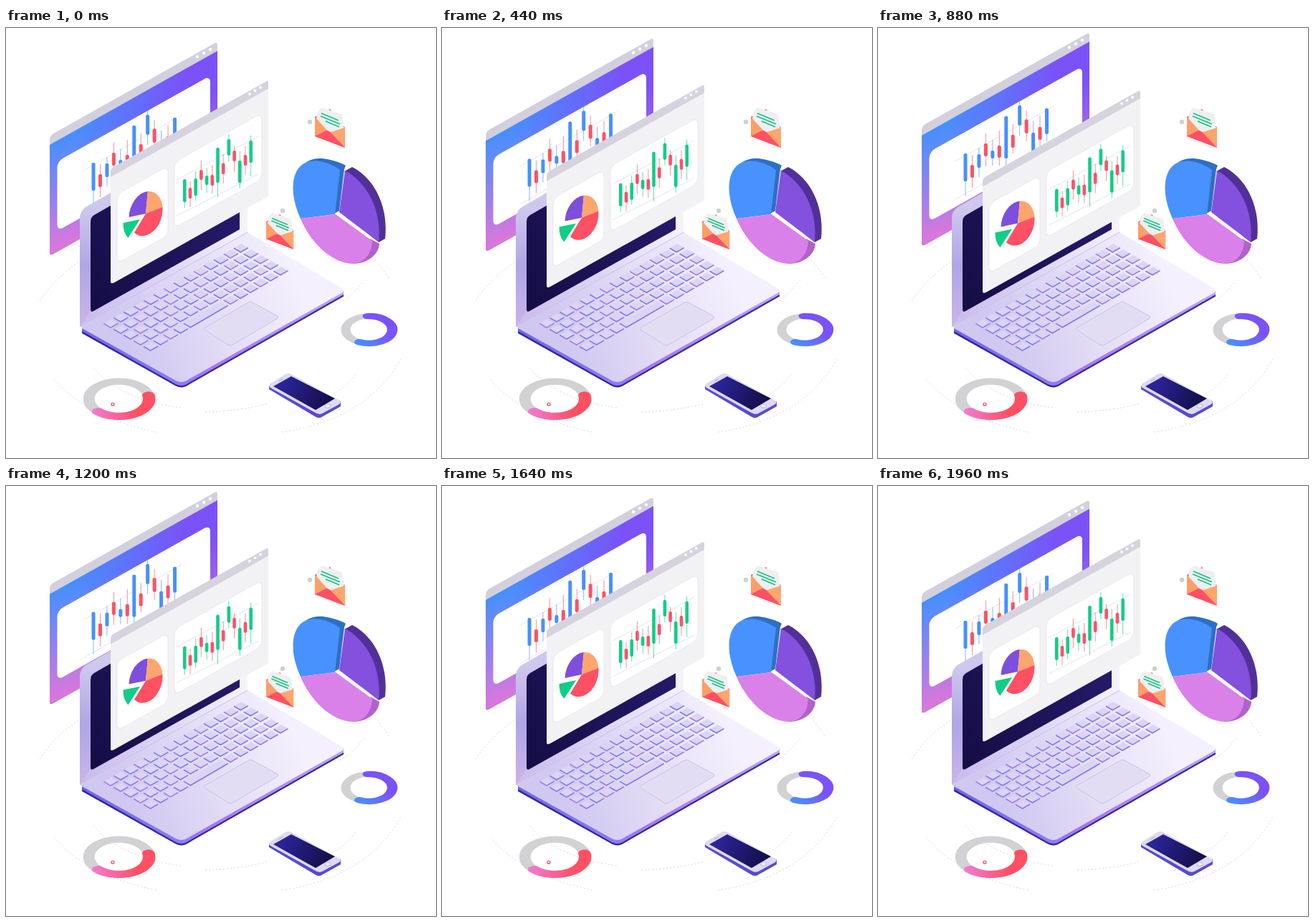
Animation of 600 by 600 pixels, one loop 2000 ms. Source, as an HTML page:

```html
<!DOCTYPE html>
<html lang="en">
<head>
<meta charset="utf-8">
<title>Isometric dashboard</title>
<style>
html, body { margin: 0; width: 100%; height: 100%; overflow: hidden; background: #fff; }
svg { display: block; width: 100vw; height: 100vh; }
</style>
</head>
<body>
<svg id="stage" viewBox="0 0 600 600">
  <defs>
    <linearGradient id="sky" gradientUnits="userSpaceOnUse" x1="40" y1="0" x2="190" y2="30">
      <stop offset="0" stop-color="#478fff"/><stop offset="1" stop-color="#7a52f7"/>
    </linearGradient>
    <linearGradient id="blush" gradientUnits="userSpaceOnUse" x1="40" y1="20" x2="8" y2="160">
      <stop offset="0" stop-color="#d877dc" stop-opacity="0"/><stop offset="1" stop-color="#d877dc"/>
    </linearGradient>
    <linearGradient id="lid" gradientUnits="userSpaceOnUse" x1="0" y1="250" x2="0" y2="415">
      <stop offset="0" stop-color="#cfc8ee"/><stop offset=".5" stop-color="#b0a5e6"/><stop offset="1" stop-color="#c9b4ea"/>
    </linearGradient>
    <linearGradient id="chin" gradientUnits="userSpaceOnUse" x1="110" y1="0" x2="337" y2="0">
      <stop offset="0" stop-color="#cbbcec"/><stop offset=".5" stop-color="#ddd5f4"/><stop offset="1" stop-color="#f6f3fd"/>
    </linearGradient>
    <linearGradient id="glass" gradientUnits="userSpaceOnUse" x1="118" y1="390" x2="326" y2="260">
      <stop offset="0" stop-color="#150d45"/><stop offset="1" stop-color="#251a69"/>
    </linearGradient>
    <linearGradient id="deck" gradientUnits="userSpaceOnUse" x1="170" y1="440" x2="400" y2="340">
      <stop offset="0" stop-color="#d0c8f0"/><stop offset=".5" stop-color="#e3ddf6"/><stop offset="1" stop-color="#f4f0fd"/>
    </linearGradient>
    <linearGradient id="side" gradientUnits="userSpaceOnUse" x1="106" y1="0" x2="471" y2="0">
      <stop offset="0" stop-color="#7065e8"/><stop offset=".36" stop-color="#8b7cf0"/>
      <stop offset=".5" stop-color="#a978e6"/><stop offset="1" stop-color="#b9a5ee"/>
    </linearGradient>
    <linearGradient id="phone" gradientUnits="userSpaceOnUse" x1="385" y1="490" x2="445" y2="525">
      <stop offset="0" stop-color="#2c259c"/><stop offset="1" stop-color="#15104d"/>
    </linearGradient>
    <linearGradient id="cool" gradientUnits="userSpaceOnUse" x1="-20" y1="30" x2="20" y2="0">
      <stop offset="0" stop-color="#4692ff"/><stop offset="1" stop-color="#7a52f8"/>
    </linearGradient>
    <linearGradient id="warm" gradientUnits="userSpaceOnUse" x1="-35" y1="0" x2="25" y2="0">
      <stop offset="0" stop-color="#ef7bd0"/><stop offset="1" stop-color="#ff5064"/>
    </linearGradient>
    <g id="mail">
      <path d="M431 124L452 113L473 139V167L431 151Z" fill="#ff5064"/>
      <path d="M434 118L440 111L469 120L472 142L453 152L433 128Z" fill="#efeff1"/>
      <path d="M440 119L464 129M439 123L466 134M446 130L465 138" stroke="#12c483" stroke-width="1.8"/>
      <path d="M431 124L451 146L431 151Z" fill="#ff9f68"/>
      <path d="M473 139V167L451 146Z" fill="#ffa56e"/>
      <path d="M431 151L447 143Q451 143 455 148L473 167Z" fill="#ff5064"/>
    </g>
  </defs>
  <g fill="none" stroke="#b9b9bd" stroke-width=".6" stroke-dasharray="2 3">
    <path d="M47 381Q70 345 116 317M68 491Q112 543 210 564M122 474Q160 519 246 530M278 536Q330 534 366 524"/>
    <path d="M385 564Q505 546 552 460M430 525Q470 508 488 483M491 305Q517 320 534 349M466 383Q482 374 500 352"/>
  </g>
  <g id="back"></g>
  <g id="laptop"></g>
  <g id="front"></g>
  <g id="extras"></g>
</svg>
<script>
const $ = id => document.getElementById(id);
const RED = '#ff5064', GREEN = '#0fce87', BLUE = '#4691ff';

const path = (d, fill, more = '') => `<path d="${d}" fill="${fill}" ${more}/>`;
const rect = (x, y, w, h, r, fill, more = '') =>
  `<rect x="${x}" y="${y}" width="${w}" height="${h}" rx="${r}" fill="${fill}" ${more}/>`;
const dot = (x, y, r, fill) => `<circle cx="${x}" cy="${y}" r="${r}" fill="${fill}"/>`;
const line = (x1, y1, x2, y2, color, w, opacity = 1) =>
  `<path d="M${x1} ${y1}L${x2} ${y2}" stroke="${color}" stroke-width="${w}" opacity="${opacity}"/>`;
const polar = (r, deg) => {
  const a = deg * Math.PI / 180;
  return `${(r * Math.cos(a)).toFixed(3)} ${(r * Math.sin(a)).toFixed(3)}`;
};
const arc = (r, from, to) => `${polar(r, from)}A${r} ${r} 0 ${to - from > 180 ? 1 : 0} 1 ${polar(r, to)}`;

// Each row: body top, body bottom, wick top, wick bottom.
function candles(x0, step, rows, up, width) {
  return rows.map(([top, end, high, low], i) => {
    const x = x0 + i * step, color = i % 2 ? RED : up;
    return line(x, high, x, low, color, 1, .65) + rect(x - width / 2, top, width, end - top, 2, color);
  }).join('');
}

function backWindow() {
  const bar = 'M0 13V6Q0 0 6 0H230Q234 0 234 5V13Z';
  const body = 'M0 12H234V168H5Q0 168 0 164Z';
  const rows = [
    [188, 227, 188, 247], [204, 222, 190, 236], [189, 208, 180, 221], [174, 192, 160, 206],
    [184, 195, 169, 205], [177, 194, 156, 205], [136, 195, 136, 205], [162, 180, 147, 188],
    [121, 149, 113, 163], [140.5, 160, 128, 171], [159, 185, 143, 198], [151, 169, 135, 178],
    [125, 161, 125, 171]];
  return `<g transform="matrix(1 -.56 0 1 61 150)">
    ${path(body, 'url(#sky)')}${path(body, 'url(#blush)')}${path(bar, '#d3d0de')}
    ${rect(10.5, 42, 213.5, 97, 8, '#fff')}</g>` +
    dot(267, 40, 2.2, '#fff') + dot(276, 35, 2.2, '#fff') + dot(285, 30, 2.2, '#fff') +
    line(108, 199, 245, 122, '#dcdcf2', .8) + line(108, 252, 245, 175, '#dcdcf2', .8) +
    candles(122, 9.46, rows, BLUE, 5);
}

function pieChart() {
  const slice = (from, to, fill, x = 0, y = 0) =>
    `<g transform="matrix(23.5 -6 0 30.5 ${195 + x} ${259 + y})">${path(`M0 0L${arc(1, from, to)}Z`, fill)}</g>`;
  return slice(182, 277, '#7d4fdc') + slice(277, 354, '#ffa56e') +
    slice(-6, 133, RED) + slice(135, 182, GREEN, -8, 8);
}

function frontWindow() {
  const rows = [
    [211, 243, 211, 251], [223, 238, 214, 250], [210, 234, 200, 241], [198, 212, 185, 226],
    [206, 219, 195, 230], [205, 220, 191, 231], [167, 216, 167, 236], [188.5, 204, 176, 217],
    [155, 178, 148, 186], [171, 186, 165, 200], [185, 216, 172, 224], [177, 192, 165, 205],
    [157, 188, 150, 207]];
  const edge = 'stroke="#e9e7ee" stroke-width="1"';
  return `<g transform="matrix(1 -.56 0 1 146 196)">
    ${path('M0 10H220V162H5Q0 162 0 158Z', '#f2f1f4')}
    ${path('M0 12V5Q0 0 5 0H217Q220 0 220 4V12Z', '#d6d3df')}
    ${rect(9, 41, 71, 97, 8, '#fff', edge)}${rect(89, 41, 122, 92, 8, '#fff', edge)}</g>` +
    dot(340, 92, 1.9, '#fff') + dot(347.5, 87.5, 1.9, '#fff') + dot(355, 83, 1.9, '#fff') +
    line(238, 212, 352, 151, '#d9dcee', .8) + line(238, 262, 352, 204, '#d9dcee', .8) +
    pieChart() + candles(249.3, 7.7, rows, GREEN, 4.6);
}

function keyboard() {
  let out = '';
  const key = (col, row, span) => {
    const x = 136.5 + col * 13.95 + row * 13.9, y = 412.5 - col * 8.1 + row * 8;
    const w = span * 13.95 - 3.4, h = w * .58;
    out += path(`M${x} ${y}l${w} ${-h}l9.5 5.6l${-w} ${h}Z`, '#dbd5f3') +
      `<path d="M${x} ${y}l9.5 5.6l${w} ${-h}" fill="none" stroke="${(col + row) % 3 ? '#8279ea' : '#a17be4'}" stroke-width="1.6"/>`;
  };
  for (let row = 0; row < 5; row++)
    for (let col = 0; col < 14; col++) {
      const space = row === 4 && col === 4;
      key(col, row, space ? 4 : 1);
      if (space) col += 3;
    }
  return out;
}

function laptop() {
  return path('M103 417V266Q103 256 111 250L328 125Q337 121 337 132V290Z', 'url(#lid)') +
    path('M103 417L118 394L326 278V140L337 132V290Z', 'url(#chin)') +
    path('M118 393V270Q118 264 123 261L326 144V281L122 395Q118 397 118 393Z', 'url(#glass)') +
    path('M106 419V426L237 499.5Q245 503.5 252 499.5L471 374.5V367Z', '#3426a8') +
    path('M106 417V423L237 497Q245 501 252 497L471 372V366Z', 'url(#side)') +
    path('M104 416L337 285L468 363Q474 367 468 370L252 492Q245 496 237 492L106 419Z', 'url(#deck)') +
    line(107, 414, 337, 285, '#c9bfee', 1) +
    keyboard() +
    path('M276 419L338 383Q341 381 344 383L379 402Q381 404 378 406L316 442Q313 444 310 442L277 421Z',
      '#e3ddf4', 'stroke="#cbc2e9" stroke-width="1"');
}

function bigPie() {
  return path('M416 189C427 181 440 181 448 183C458 185 468 188 474 192L472 197L465 255L458 259L464 200C452 191 430 182 416 189Z', '#2e6fc6') +
    path('M459 260L411 266C397 236 396 203 414 190C430 180 452 188 466 198Z', '#4892ff') +
    path('M472 200L483 194C513 209 534 248 529 294L520 299C521 255 500 214 472 200Z', '#52309a') +
    path('M465 257L473 199C500 213 525 250 520 299Z', '#8450de') +
    path('M508 294L521 301C520 315 507 328 484 329Z', '#b062cb') +
    path('M460 260L411 266C423 296 452 328 484 329C500 328 510 316 511 297Z', '#da80e9');
}

// The coloured arc is a little wider than its grey track.
function ring(x, y, r, w, from, to, paint) {
  return `<g transform="translate(${x} ${y}) scale(1 .582)" fill="none" stroke-width="${w}">
    <circle r="${r}" stroke="#d2d2d5"/>
    <path d="M${arc(r, from, to)}" stroke="url(#${paint})" stroke-width="${w + 1.5}" stroke-linecap="round"/></g>`;
}

function phone() {
  return path('M367 499V504L431 542Q437 546 442 542L467 528V521Z', '#5a49d2') +
    path('M369 496L390 483Q394 481 398 483L464 519Q469 522 465 525L441 538Q437 540 432 537L369 502Q365 499 369 496Z', '#dedaf0') +
    path('M373 500L398 486L459 517L432 533Z', 'url(#phone)') +
    line(380, 493, 386, 489.5, '#b7b0d6', 1.2) +
    '<ellipse cx="449" cy="527.5" rx="4" ry="2.8" fill="#ece9f7" stroke="#b9b1dc"/>';
}

function extras() {
  return bigPie() + '<use href="#mail"/><use href="#mail" transform="translate(-26 158) scale(.903)"/>' +
    dot(424, 131, 3.2, '#d0d0d3') + dot(386, 255, 3.2, '#d0d0d3') +
    ring(506.5, 421, 32.5, 13, -93, 114, 'cool') +
    ring(157.7, 517.5, 42, 16, -12, 134, 'warm') +
    '<circle cx="149" cy="525" r="2" fill="#fff" stroke="#e8415a" stroke-width="1.2"/>' + phone();
}

$('back').innerHTML = backWindow();
$('laptop').innerHTML = laptop();
$('front').innerHTML = frontWindow();
$('extras').innerHTML = extras();

// The windows drift in opposite directions, in 40 ms steps.
function draw() {
  const t = Math.floor(performance.now() % 2000 / 40) * 40;
  const swing = (1 - Math.cos(t / 1000 * Math.PI)) / 2;
  $('back').setAttribute('transform', `translate(0 ${-13.5 * swing})`);
  $('front').setAttribute('transform', `translate(0 ${14 * swing})`);
  requestAnimationFrame(draw);
}
draw();
</script>
</body>
</html>
```
